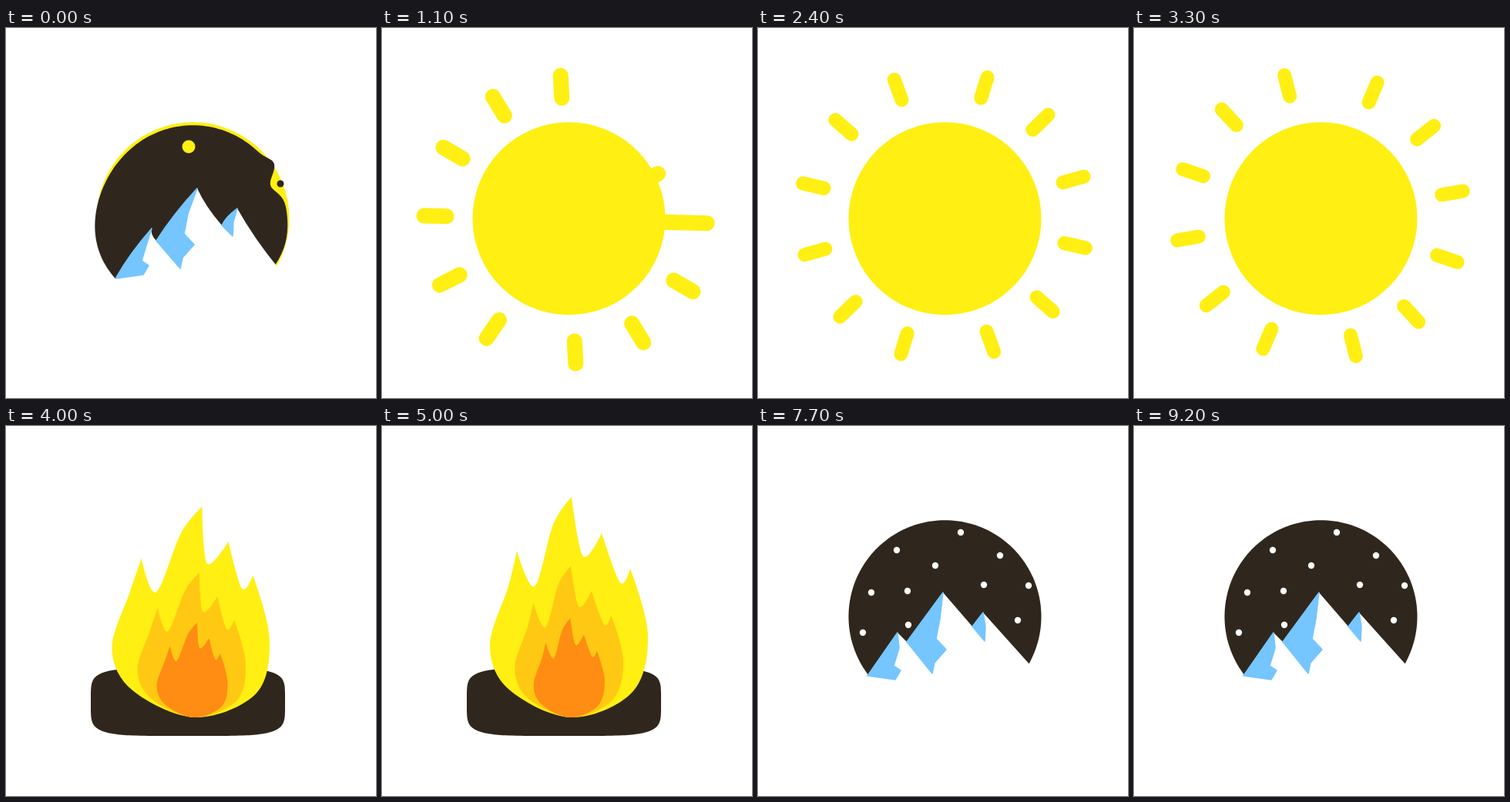
An HTML page with a canvas for the animation above (9.3 s loop, 480 by 480 pixels).

```html
<!DOCTYPE html>
<html lang="en">
<head>
<meta charset="utf-8">
<title>Sun, fire, night</title>
<style>
html, body { margin: 0; width: 100%; height: 100%; overflow: hidden; background: #fff; }
canvas { display: block; width: 480px; height: 480px; }
</style>
</head>
<body>
<canvas id="stage" width="480" height="480"></canvas>
<script>
const ctx = document.getElementById('stage').getContext('2d');
const LOOP = 9300, STEP = 100, TAU = 2 * Math.PI, DEG = Math.PI / 180;
const YELLOW = '#ffef12', AMBER = '#ffc913', ORANGE = '#ff8c13';
const DARK = '#2f271d', BLUE = '#75c5ff', WHITE = '#fff';
const SUN = { x: 242.5, y: 247.2, r: 125 };

const pts = s => s.split(' ').map(p => p.split(',').map(Number));
const clamp = v => Math.max(0, Math.min(1, v));
const span = (t, a, b) => clamp((t - a) / (b - a));
const ease = u => u * u * (3 - 2 * u);
const mix = (a, b, u) => a + (b - a) * u;
const between = (p, q, u) => [mix(p[0], q[0], u), mix(p[1], q[1], u)];
const morph = (a, b, u) => a.map((p, i) => between(p, b[i], u));
const scaled = (list, k, cx, cy) => list.map(p => between([cx, cy], p, k));

// Dark bodies share one angular sampling, so they can morph into each other
const sweep = f => Array.from({ length: 180 }, (_, i) => f(i * 2));
const polar = radius => sweep(a =>
  [SUN.x + radius(a) * Math.cos(a * DEG), SUN.y + radius(a) * Math.sin(a * DEG)]);
const bump = (a, at, width) => Math.exp(-(((((a - at + 540) % 360) - 180) / width) ** 2));
const boxy = v => Math.sign(v) * Math.abs(v) ** 0.4;

const DISC = polar(() => SUN.r);
const MELT = polar(a => 121 + 8 * bump(a, 160, 35) + 3 * bump(a, 15, 18)
  + 8 * bump(a, 326, 6) - 12 * bump(a, 337, 8));
const CLOUD = polar(a => 127 - 30 * bump(a, 215, 22) - 23 * bump(a, 270, 42) - 22 * bump(a, 308, 24));
const LOG = sweep(a => [236 + 126 * boxy(Math.cos(a * DEG)), 358 + 44 * boxy(Math.sin(a * DEG))]);

// Ridge alternates foot, peak, foot, ...; each peak has the inner edge of its shadow
const RIDGE = pts('142,324 181,268 193,280 240,216 278,260 292,242 353,310');
const SHADOWS = ['178,329 185,317 176,311 183,288', '226,321 229,307 244,290 231,276 236,250', '294,279 295,260'].map(pts);

// Flame outline, clockwise from the bottom
const FLAME = pts('246,378 165,342 140,285 164,208 175,162 198,208 222,128 246,92 261,169 285,139 309,203 322,185 345,270 325,345');
const TIPS = [4, 7, 9, 11];
const ROUND = FLAME.map((_, i) => {
  const a = TAU * (0.25 + i / FLAME.length);
  return [SUN.x + SUN.r * Math.cos(a), SUN.y + SUN.r * Math.sin(a)];
});

// The flame laid along the ridge: tips on peaks, gaps in valleys
const [FOOT, P1, V1, P2, V2, P3, END] = RIDGE.map(([x, y]) => [x, y - 6]);
const GLOW = [[246, 360], [165, 340], FOOT, between(FOOT, P1, 0.5), P1, V1, between(V1, P2, 0.5),
  P2, V2, P3, between(P3, END, 0.4), between(P3, END, 0.55), END, [325, 345]];

const STARS = pts('263,138 180,161 314,168 230,181 147,216 194,214 293,206 351,207 337,252 136,268 195,258');

function polygon(list, color) {
  ctx.beginPath();
  list.forEach(p => ctx.lineTo(...p));
  ctx.fillStyle = color;
  ctx.fill();
}

// Smooth closed curve, sharp at the given corners
function blob(p, color, corners) {
  const n = p.length;
  ctx.beginPath();
  ctx.moveTo(...p[0]);
  for (let i = 0; i < n; i++) {
    const j = (i + 1) % n, a = p[(i + n - 1) % n], b = p[i], c = p[j], d = p[(i + 2) % n];
    const kb = corners.includes(i) ? 0 : 1 / 6, kc = corners.includes(j) ? 0 : 1 / 6;
    ctx.bezierCurveTo(b[0] + (c[0] - a[0]) * kb, b[1] + (c[1] - a[1]) * kb,
      c[0] - (d[0] - b[0]) * kc, c[1] - (d[1] - b[1]) * kc, c[0], c[1]);
  }
  ctx.fillStyle = color;
  ctx.fill();
}

function dot(x, y, r, color) {
  ctx.beginPath();
  ctx.arc(x, y, r, 0, TAU);
  ctx.fillStyle = color;
  ctx.fill();
}

// lean: peaks bend right and up; low: valleys sink; place: final position
function mountains(lean, low, place) {
  const ridge = RIDGE.map(([x, y], i) => place(
    i % 6 === 0 ? [x, y + 4 * low + lean] :
    i % 2 ? [x + 8 * lean, y - 8 * lean + 3 * low] :
    [x + 2 * lean, y - 4 * lean + 15 * low]));
  const slope = (a, b) => ctx.quadraticCurveTo((a[0] + b[0]) / 2 - 5 * lean, (a[1] + b[1]) / 2, ...b);

  ctx.beginPath();
  ctx.moveTo(...ridge[0]);
  for (let i = 1; i < ridge.length; i++) slope(ridge[i - 1], ridge[i]);
  ctx.lineTo(ridge[6][0], 440);
  ctx.lineTo(ridge[0][0], 440);
  ctx.fillStyle = WHITE;
  ctx.fill();

  ctx.fillStyle = ctx.strokeStyle = BLUE;
  ctx.lineWidth = 1.5;
  ctx.lineJoin = 'round';
  SHADOWS.forEach((inner, i) => {
    const peak = ridge[2 * i + 1], foot = ridge[2 * i];
    ctx.beginPath();
    ctx.moveTo(...peak);
    slope(peak, foot);
    inner.forEach(([x, y]) => ctx.lineTo(...place([x - 12 * low, y - 9 * lean - 10 * low])));
    ctx.closePath();
    ctx.fill();
    ctx.stroke();
  });
}

function rays(t) {
  const s = Math.max(0, t - 1100) / 100;
  const turn = 17 - 22.9 * s - 0.47 * s * s;
  const settle = span(t, 1100, 2400), keep = 1 - span(t, 3300, 3700);
  const w = mix(20, 18, settle), cy = mix(248.5, 243.5, settle);
  ctx.strokeStyle = YELLOW;
  ctx.lineWidth = w;
  ctx.lineCap = 'round';
  for (let k = 0; k < 12; k++) {
    const p = Math.min(span(t, 450 + 60 * k, 600 + 60 * k), keep);
    if (!p) continue;
    const a = (250 - 30 * k + 1.5 * (k % 6) + turn) * DEG;
    const tip = Math.min(197, 100 + 123 * p) - w / 2;
    const base = Math.min(mix(112, mix(148, 151, settle), clamp((p - 0.73) / 0.27)) + w / 2, tip);
    ctx.beginPath();
    for (const r of [base, tip]) ctx.lineTo(241.5 + r * Math.cos(a), cy + r * Math.sin(a));
    ctx.stroke();
  }
}

function sun(t) {
  rays(t);
  dot(SUN.x, SUN.y, SUN.r, YELLOW);
}

function dawn(t) {
  const u = t / 600, e = u * u;
  sun(t);
  if (u >= 1) return;
  polygon(MELT.map(([x, y]) => [mix(x, SUN.x, e / 2), mix(y, 382, e)]), DARK);
  dot(237, mix(154, 260, e), 8.5 + 60 * e, YELLOW);
  if (u < 0.3) dot(356, 202, 4.5 * (1 - u / 0.3), DARK);
  mountains(1, 0, ([x, y]) => [x, mix(y, 382, e)]);
}

// Sideways sway that grows towards the tips
function flicker(t) {
  const p = (t - 5000) / 600 * TAU;
  const squash = 1 - 0.03 * (1 - Math.cos(p));
  return FLAME.map(([x, y]) => {
    const h = (378 - y) / 286;
    return [x + 5 * h * (Math.sin(p + 5 * h) - Math.sin(5 * h)), 378 - (378 - y) * squash];
  });
}

function flames(shape, grow = 1) {
  blob(shape, YELLOW, TIPS);
  blob(scaled(shape, 0.687 * grow, 243, 378), AMBER, TIPS);
  blob(scaled(shape, 0.45 * grow, 243, 378), ORANGE, TIPS);
}

function fire(t) {
  const u = ease(span(t, 3500, 4000));
  rays(t);
  polygon(scaled(LOG, u, 240, 370), DARK);
  flames(morph(ROUND, flicker(t), u), ease(span(t, 3600, 4000)));
}

function stars(t) {
  const size = 4.2 * span(t, 6500, 7000);
  const k = Math.floor(t / STEP + 1) % 3 * TAU / 3;
  STARS.forEach(([x, y], i) => {
    const a = i * 2;
    dot(x + 6 * (Math.cos(a + k) - Math.cos(a)), y + 6 * (Math.sin(a + k) - Math.sin(a)), size, WHITE);
  });
}

function night(t) {
  const u = ease(span(t, 6000, 6300)), v = ease(span(t, 6300, 6900));
  polygon(morph(morph(LOG, CLOUD, u), DISC, v), DARK);
  stars(t);
  if (v < 1) flames(morph(flicker(t), scaled(GLOW, 1 - 0.25 * v, 243, 360), u));
  mountains(0, 1 - v, ([x, y]) => [x, y + 160 * (1 - u)]);
}

function draw(now) {
  const t = Math.floor(now % LOOP / STEP) * STEP;
  ctx.fillStyle = WHITE;
  ctx.fillRect(0, 0, 480, 480);
  const scene = t < 1100 ? dawn : t < 3500 ? sun : t <= 6000 ? fire : night;
  scene(t);
}

const began = performance.now();
function tick() {
  draw(performance.now() - began);
  requestAnimationFrame(tick);
}
tick();
</script>
</body>
</html>
```
